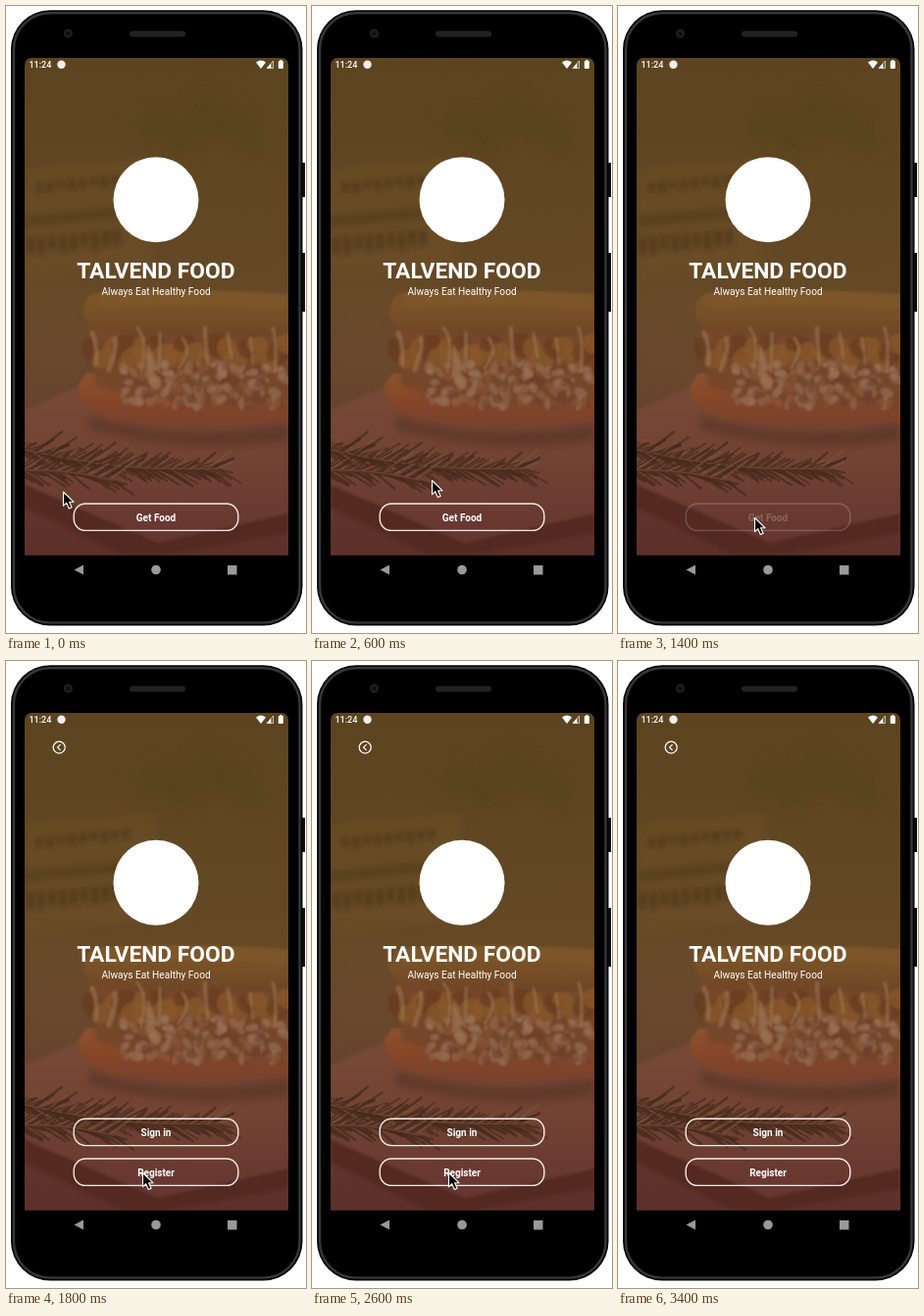
An HTML page with a canvas for the animation above (3500 ms loop, 306 by 640 pixels).

```html
<!DOCTYPE html>
<html lang="en">
<head>
<meta charset="utf-8">
<title>Food app</title>
<style>
html, body { margin: 0; width: 100%; height: 100%; overflow: hidden; background: #fff; }
canvas { display: block; width: 306px; height: 640px; }
</style>
</head>
<body>
<canvas id="stage"></canvas>
<script>
const W = 306, H = 640, LOOP = 3500, STEP = 100;
const SCREEN = { x: 19, y: 53, w: 269, h: 507.5 };
const ratio = window.devicePixelRatio || 1;

function layer(canvas = document.createElement('canvas')) {
  canvas.width = W * ratio;
  canvas.height = H * ratio;
  const c = canvas.getContext('2d');
  c.scale(ratio, ratio);
  return c;
}

function seeded(seed) {
  return () => {
    seed = (seed * 1664525 + 1013904223) >>> 0;
    return seed / 4294967296;
  };
}

function rounded(c, x, y, w, h, r) {
  c.beginPath();
  c.roundRect(x, y, w, h, r);
}

function disc(c, x, y, r, fill) {
  blob(c, x, y, r, r, 0, fill);
}

function blob(c, x, y, rx, ry, angle, fill) {
  c.beginPath();
  c.ellipse(x, y, rx, ry, angle, 0, Math.PI * 2);
  c.fillStyle = fill;
  c.fill();
}

function blur(c, r) {
  c.filter = r ? `blur(${r * ratio}px)` : 'none';
}

function shape(c, path, fill, soft = 0) {
  blur(c, soft);
  c.fillStyle = fill;
  c.fill(new Path2D(path));
  blur(c, 0);
}

function text(c, str, x, y, font, align = 'center') {
  c.font = font + ' Roboto, sans-serif';
  c.textAlign = align;
  c.fillStyle = '#fff';
  c.fillText(str, x, y);
}

function gradient(c, x0, y0, x1, y1, ...colors) {
  const g = c.createLinearGradient(x0, y0, x1, y1);
  colors.forEach((col, i) => g.addColorStop(i / (colors.length - 1), col));
  return g;
}

function drawPhone(c) {
  c.fillStyle = '#fff';
  c.fillRect(0, 0, W, H);
  c.fillStyle = '#0c0c0c';
  c.fillRect(300, 160, 5, 35);
  c.fillRect(300, 252, 5, 60);
  rounded(c, 5, 4.2, 297.5, 628.3, 40);
  c.fillStyle = '#050505';
  c.fill();
  rounded(c, 8, 7.2, 291.5, 622.3, 37);
  c.strokeStyle = '#383838';
  c.lineWidth = 2.2;
  c.stroke();
  rounded(c, 10.5, 9.7, 286.5, 617.3, 34);
  c.fillStyle = '#000';
  c.fill();
  rounded(c, 126, 25.5, 57, 6, 3);
  c.fillStyle = '#222';
  c.fill();
  disc(c, 63.5, 28, 4.5, '#1f1f21');
  disc(c, 63.5, 28, 2.2, '#0c0c10');

  shape(c, 'M69.5 575.5L79 570.5V580.5Z', '#999');
  disc(c, 153, 575.5, 4.8, '#999');
  c.fillStyle = '#999';
  c.fillRect(226, 571, 9.5, 9.5);
}

function drawBackdrop(c) {
  c.fillStyle = gradient(c, 0, 53, 0, 561, '#5c4420', '#614722', '#664a28', '#694330', '#5a2d2b');
  c.fillRect(19, 53, 269, 508);

  // out-of-focus leaves
  blur(c, 9);
  for (let i = 0; i < 5; i++) {
    blob(c, 150 + i * 25, 122 + 14 * Math.sin(i * 2), 19, 11, i, 'rgba(77,66,29,.55)');
  }
  blur(c, 0);

  // out-of-focus crates
  shape(c, 'M19 166L150 155L154 208L19 224Z', 'rgba(119,86,42,.35)', 5);
  shape(c, 'M19 226L146 214L150 264L19 280Z', 'rgba(122,86,45,.35)', 5);
  shape(c, 'M19 214L150 203V211L19 225Z', 'rgba(60,43,20,.35)', 3);
  blur(c, 2.5);
  c.fillStyle = 'rgba(72,50,23,.6)';
  for (let i = 0; i < 9; i++) {
    const h = 2 * Math.sin(i * 2.3);
    c.fillRect(30 + i * 11, 180 - i, 8, 10 + h);
    c.fillRect(21 + i * 11, 236 - i, 8, 17 + h);
  }
  blur(c, 0);
  shape(c, 'M19 285H90V395H19Z', 'rgba(115,80,50,.3)', 10);
}

function drawBoard(c) {
  const floor = gradient(c, 0, 480, 0, 561, '#68382f', '#5d302c');
  c.fillStyle = floor;
  c.fillRect(19, 470, 269, 91);
  shape(c, 'M19 488L155 546L288 516V538L160 561H120L19 512Z', '#52281f', 2);
  shape(c, 'M19 412L80 386L288 398V518L155 548L19 488Z',
    gradient(c, 0, 385, 0, 545, '#7b4c38', '#764536', '#683831'), 1.5);
  shape(c, 'M85 418Q180 448 288 426V444Q180 458 85 432Z', 'rgba(75,38,27,.45)', 4);
}

function drawSandwich(c) {
  const rnd = seeded(41);
  shape(c, 'M74 386Q74 414 110 422Q175 434 288 424V375H82Z',
    gradient(c, 0, 375, 0, 430, '#95562f', '#8c4829', '#7d432d'), 1);
  shape(c, 'M82 326H288V402Q190 418 92 388Z', '#79482a', 2);

  // fried pieces
  blur(c, 0.8);
  for (let i = 0; i < 20; i++) {
    const x = 88 + i * 10.5;
    blob(c, x, 352 + 8 * Math.sin(i * 1.9), 8 + rnd() * 6, 8 + rnd() * 6, rnd() * 3,
      i % 3 ? 'rgba(143,91,43,.75)' : 'rgba(104,58,31,.7)');
  }

  // pulled meat
  const meat = ['rgba(155,115,89,.6)', 'rgba(145,87,61,.65)', 'rgba(165,129,103,.55)', 'rgba(113,65,44,.6)'];
  for (let i = 0; i < 170; i++) {
    const u = rnd();
    blob(c, 118 + u * 168, 366 + rnd() * 43 - (1 - u) * 3, 3 + rnd() * 5, 2 + rnd() * 3, rnd() * 3, meat[i % 4]);
  }
  blur(c, 0);

  shape(c, 'M79 314Q78 293 98 292Q185 287 288 294V334Q240 342 205 333Q150 340 108 331Q83 333 79 314Z',
    gradient(c, 0, 290, 0, 340, '#80592a', '#7b5127', '#6f4527'), 1.2);
  shape(c, 'M94 299Q180 292 288 301V309Q190 300 94 308Z', 'rgba(150,109,57,.25)', 3);

  // sauce drips
  c.lineCap = 'round';
  blur(c, 1);
  c.strokeStyle = 'rgba(165,126,88,.6)';
  for (let i = 0; i < 9; i++) {
    const x = 88 + i * 23, y = 334 + 6 * Math.sin(i * 2.1);
    c.lineWidth = 2.5 + rnd() * 3;
    c.beginPath();
    c.moveTo(x, y);
    c.quadraticCurveTo(x + 12 * rnd(), y + 12, x + 5 - 12 * rnd(), y + 22 + rnd() * 24);
    c.stroke();
  }
  shape(c, 'M143 345Q152 352 150 370L158 390Q148 396 143 378Z', 'rgba(172,131,99,.65)', 1.5);
}

function drawRosemary(c) {
  const rnd = seeded(9);
  const sprig = (x0, y0, x1, y1, bend, n) => {
    const at = u => [x0 + (x1 - x0) * u, y0 + (y1 - y0) * u + bend * Math.sin(u * Math.PI)];
    for (let i = 0; i < n; i++) {
      const [x, y] = at(i / n), side = i % 2 ? 1 : -1;
      const len = 12 + rnd() * 15;
      c.lineWidth = 1.4 + rnd() * 1.5;
      c.strokeStyle = i % 6 ? 'rgba(67,42,28,.75)' : 'rgba(124,89,61,.6)';
      c.beginPath();
      c.moveTo(x, y);
      c.lineTo(x + len, y + side * len * (0.25 + rnd() * 0.6));
      c.stroke();
    }
    c.strokeStyle = '#6b452f';
    c.lineWidth = 1.6;
    c.beginPath();
    c.moveTo(x0, y0);
    for (let u = 0; u <= 1; u += 0.1) c.lineTo(...at(u));
    c.stroke();
  };
  blur(c, 0.4);
  sprig(6, 450, 218, 472, 8, 140);
  sprig(6, 474, 110, 484, -4, 56);
  blur(c, 0);
}

function drawStatus(c) {
  text(c, '11:24', 23.5, 63.3, '500 9px', 'left');
  disc(c, 56.5, 59.8, 4.2, '#eee');
  shape(c, 'M255 57.5Q260 53.5 265 57.5L260 64Z', '#fff');
  c.strokeStyle = '#ddd';
  c.lineWidth = 0.8;
  c.stroke(new Path2D('M266 63.5L272.5 56V63.5Z'));
  shape(c, 'M266 63.5L270.5 58.5V63.5Z', '#fff');
  c.fillStyle = '#fff';
  c.fillRect(279.2, 55, 2.2, 1.5);
  rounded(c, 277.8, 56, 5, 8, 0.8);
  c.fill();
}

function drawBrand(c, dy) {
  disc(c, 153, 197.8 + dy, 43.5, '#fff');
  text(c, 'TALVEND FOOD', 153, 278.3 + dy, 'bold 22.8px');
  text(c, 'Always Eat Healthy Food', 153, 295.2 + dy, '10.15px');
}

function drawButton(c, label, y, alpha = 1) {
  c.save();
  c.globalAlpha *= alpha;
  rounded(c, 69.2, y, 167.6, 27.4, 12);
  c.strokeStyle = '#f5ece5';
  c.lineWidth = 1.4;
  c.stroke();
  text(c, label, 153, y + 17.8, 'bold 10px');
  c.restore();
}

function drawWelcome(c, pressed) {
  drawBrand(c, 0);
  drawButton(c, 'Get Food', 508, 1 - 0.78 * pressed);
}

function drawChoice(c) {
  c.strokeStyle = '#fff';
  c.lineWidth = 1.2;
  c.beginPath();
  c.arc(54.2, 88.2, 6, 0, Math.PI * 2);
  c.stroke();
  c.stroke(new Path2D('M55.6 85.2L52.6 88.2L55.6 91.2'));
  drawBrand(c, 28.5);
  drawButton(c, 'Sign in', 467.2);
  drawButton(c, 'Register', 508);
}

function drawCursor(c, x, y) {
  const arrow = new Path2D('M0 0V14.2L3.3 11.2L5.8 17L8.6 15.8L6.1 10.2H10.5Z');
  c.save();
  c.translate(x, y);
  c.fillStyle = '#000';
  c.fill(arrow);
  c.strokeStyle = '#fff';
  c.lineWidth = 1.1;
  c.lineJoin = 'round';
  c.stroke(arrow);
  c.restore();
}

const ramp = (t, a, b) => Math.min(1, Math.max(0, (t - a) / (b - a)));
const ease = u => u * u * (3 - 2 * u);
const mix = (a, b, u) => a + (b - a) * u;

function cursorAt(t) {
  if (t < 600) {
    const u = ease(ramp(t, 0, 600));
    return [mix(58.5, 122.5, u), mix(496, 484.5, u)];
  }
  const u = ease(ramp(t, 600, 1000));
  return [mix(122.5, 139.5, u), mix(484.5, 522.5, u)];
}

const base = layer();
drawPhone(base);
base.save();
rounded(base, SCREEN.x, SCREEN.y, SCREEN.w, SCREEN.h, [7, 7, 0, 0]);
base.clip();
drawBackdrop(base);
drawBoard(base);
drawSandwich(base);
drawRosemary(base);
base.fillStyle = gradient(base, 0, 53, 0, 561, 'rgba(92,68,30,.1)', 'rgba(98,67,38,.12)', 'rgba(90,44,40,.2)');
base.fillRect(SCREEN.x, SCREEN.y, SCREEN.w, SCREEN.h);
base.restore();
drawStatus(base);

const ctx = layer(document.getElementById('stage'));

function draw(t) {
  ctx.globalAlpha = 1;
  ctx.drawImage(base.canvas, 0, 0, W, H);
  const change = ramp(t, 1400, 1700);
  if (change < 1) {
    ctx.globalAlpha = 1 - change;
    drawWelcome(ctx, ramp(t, 1200, 1350));
  }
  if (change > 0) {
    ctx.globalAlpha = change;
    drawChoice(ctx);
  }
  ctx.globalAlpha = 1;
  if (t < 3000) drawCursor(ctx, ...cursorAt(t));
}

const start = performance.now();
function tick() {
  const t = (performance.now() - start) % LOOP;
  draw(Math.floor(t / STEP) * STEP);
  requestAnimationFrame(tick);
}
tick();
</script>
</body>
</html>
```
